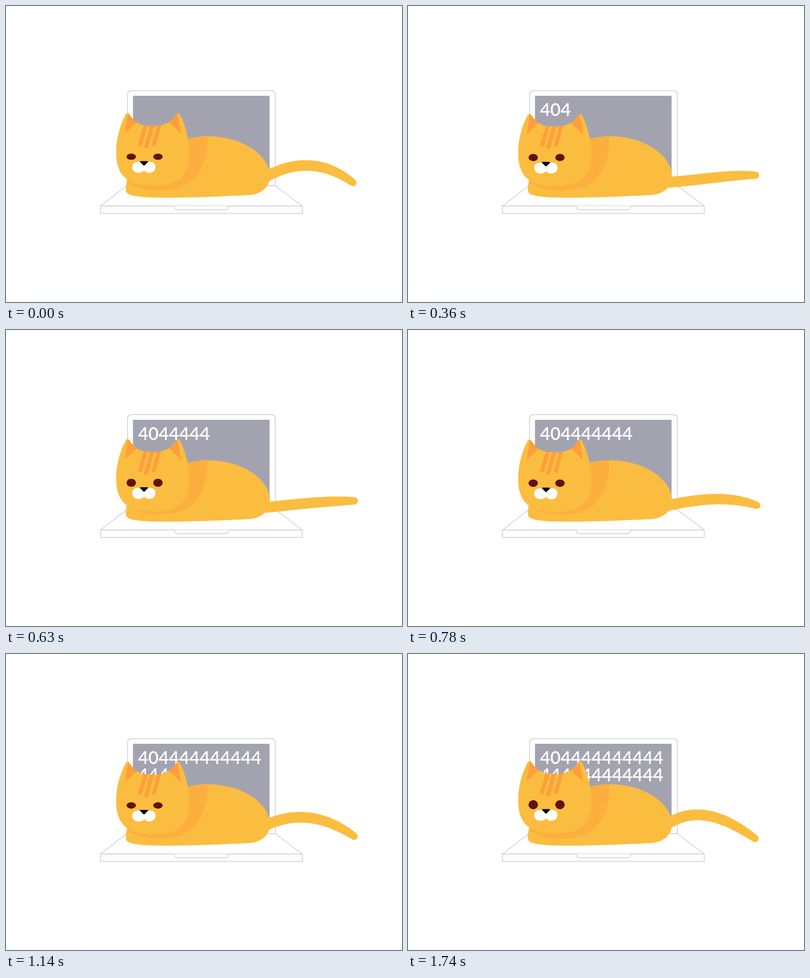
An HTML page that plays this animation: 800 px wide and 600 px high, repeating every 1800 ms.

```html
<!DOCTYPE html>
<html lang="en">
<head>
<meta charset="utf-8">
<title>Cat on a laptop</title>
<style>
  html, body { margin: 0; width: 100%; height: 100%; overflow: hidden; background: #fff; }
  svg { display: block; width: 100vw; height: 100vh; }
  .line { fill: #fff; stroke: #cdcdcf; stroke-width: 1.5; stroke-linejoin: round; }
  .fur { fill: #fbbd40; }
  .shade { fill: #fcaf3e; }
  .mark { fill: #fe9f3c; }
  .eye { fill: #5f1408; }
  text { font: 600 35.8px Lato, "Open Sans", sans-serif; fill: #fff; }
</style>
</head>
<body>
<svg viewBox="0 0 800 600">
  <defs>
    <path id="headShape" d="M241.5 220 Q244.5 215 248.5 218 C257 230 262 243 298 243
      C326 243 337 231 344 219.5 Q347.5 214.5 351.5 219.5 C363 243 370.5 272 370.5 300
      C370.5 345 345 364 298 364 C246 364 222.5 345 222.5 296 C222.5 268 231 240 241.5 220Z"/>
    <clipPath id="headClip"><use href="#headShape"/></clipPath>
  </defs>

  <g class="line">
    <path d="M245.5 364 V180 Q245.5 171.500 254 171.500 H535.500 Q544 171.500 544 180 V364Z"/>
    <path d="M244 364 H544 L598.500 405.500 H191Z"/>
    <path d="M191 405.500 H598.500 V420.500 H191Z"/>
    <path d="M339.500 405.500 Q340.500 413 347 413 H442.500 Q449 413 450 405.500"/>
  </g>
  <path fill="#a3a3b0" d="M256.500 182 H532.500 V352 H256.500Z"/>
  <text id="row1" x="266.700" y="222.500"></text>
  <text id="row2" x="266.700" y="257.500"></text>

  <path id="tail" class="fur"/>
  <path class="fur" d="M245.500 350 C242 362 241 370 243 377 C246 383 258 388.500 320 388.500
    C380 388.500 430 386 488 383.500 C518 382 533 366 533 345 C533 303 478 264 407 264
    C393 264 380 266 368 269 L300 290Z"/>
  <path class="shade" d="M368 269 C380 266 393 264 407 264 C407.500 318 391 374 308 374.500
    C280 374.500 257 366 244.500 357 L245.500 350 L300 290Z"/>

  <g id="head">
    <use href="#headShape" class="fur"/>
    <g class="mark" clip-path="url(#headClip)">
      <path d="M246.500 218 L264 236 L239.500 259Z"/>
      <path d="M347 218 L329.500 236 L354 259Z"/>
      <path d="M278.500 240 H286.500 L274.500 283.500 H266Z"/>
      <path d="M292 240 H300 L287 288 H278.500Z"/>
      <path d="M306 240 H314 L302 283.500 H294Z"/>
    </g>
    <ellipse class="eye" cx="253" cy="305.500" rx="9.500"/>
    <ellipse class="eye" cx="307" cy="305.500" rx="9.500"/>
    <path fill="#fff" d="M266 316 H291 C299 316 302 321 302 326.500 C302 333 297 338 290 338
      C285 338 281 336 279 333 C277 336 273 338 267.500 338 C260 338 255 333 255 327
      C255 321 258 316 266 316Z"/>
    <path d="M271.500 314.500 H286 Q287.800 315 286.600 316.600 L280 323 Q278.800 324.200 277.600 323
      L271 316.600 Q269.700 315 271.500 314.500Z"/>
  </g>
</svg>
<script>
const LOOP = 1800, STEP = 30, LAST = 1740;
const $ = id => document.getElementById(id);
const eyes = document.querySelectorAll(".eye");

// Smooth track through [time, value] keys, held after the last key.
function track(keys) {
  const n = keys.length;
  const rise = i => (keys[i + 1][1] - keys[i][1]) / (keys[i + 1][0] - keys[i][0]);
  const slope = keys.map((k, i) => {
    if (i === 0) return rise(0);
    if (i === n - 1) return 0;
    const a = rise(i - 1), b = rise(i);
    return a * b > 0 ? 2 * a * b / (a + b) : 0;
  });
  return t => {
    if (t >= keys[n - 1][0]) return keys[n - 1][1];
    const i = keys.findIndex((k, j) => t < keys[j + 1][0]);
    const [t0, v0] = keys[i], [t1, v1] = keys[i + 1];
    const h = t1 - t0, u = (t - t0) / h, w = 1 - u;
    return v0 * w * w * (1 + 2 * u) + v1 * u * u * (3 - 2 * u)
      + h * u * w * (slope[i] * w - slope[i + 1] * u);
  };
}

const headDrop = track([[0, 0], [120, 0], [210, .4], [510, 3], [780, 5], [1140, 1.5], [1350, 0]]);
const eyeOpen = track([[0, 6.3], [210, 6.1], [510, 8.5], [780, 7.5], [1140, 6.5], [1440, 8.8], [1680, 9.2]]);

// Tail poses: time, heights at the root, one third, two thirds and the tip, then the tip's x.
const poses = [
  [0, 343.5, 324.5, 328.5, 358, 701],
  [210, 350.5, 341, 336.5, 345.5, 701.5],
  [510, 361, 357, 351, 342, 703],
  [780, 354.5, 345, 343.5, 355.5, 704.5],
  [1140, 345, 331, 339.5, 369.5, 703.5],
  [1440, 341, 326, 340, 374, 701]
];
const tailTracks = [1, 2, 3, 4, 5].map(c => track(poses.map(p => [p[0], p[c]])));

function tailPath(t) {
  const [y0, ya, yb, y3, tipX] = tailTracks.map(f => f(t));
  const rootX = 530, span = tipX - rootX;
  const y1 = (-5 * y0 + 18 * ya - 9 * yb + 2 * y3) / 6;
  const y2 = (2 * y0 - 9 * ya + 18 * yb - 5 * y3) / 6;
  const top = [], bottom = [], n = 32, start = -.08;
  let r;
  for (let i = 0; i <= n; i++) {
    const s = start + (1 - start) * i / n, q = 1 - s;
    const x = rootX + span * s;
    const y = q * q * q * y0 + 3 * q * q * s * y1 + 3 * q * s * s * y2 + s * s * s * y3;
    const dy = 3 * (q * q * (y1 - y0) + 2 * q * s * (y2 - y1) + s * s * (y3 - y2));
    const len = Math.hypot(span, dy);
    r = 11 - .4 * s - 3.3 * s ** 5;
    const nx = dy / len * r, ny = span / len * r;
    top.push(`${(x + nx).toFixed(2)} ${(y - ny).toFixed(2)}`);
    bottom.unshift(`${(x - nx).toFixed(2)} ${(y + ny).toFixed(2)}`);
  }
  return `M${top.join("L")}A${r} ${r} 0 0 1 ${bottom.join("L")}Z`;
}

function draw(t) {
  const count = Math.max(0, Math.min(24, Math.floor((t - 140) / 66)));
  const typed = ("40" + "4".repeat(22)).slice(0, count);
  $("row1").textContent = typed.slice(0, 12);
  $("row2").textContent = typed.slice(12);
  $("tail").setAttribute("d", tailPath(t));
  $("head").setAttribute("transform", `translate(0 ${headDrop(t)})`);
  eyes.forEach(e => e.setAttribute("ry", eyeOpen(t)));
}

const begin = performance.now();
function tick() {
  const t = (performance.now() - begin) % LOOP;
  draw(Math.min(LAST, Math.floor(t / STEP) * STEP));
  requestAnimationFrame(tick);
}
tick();
</script>
</body>
</html>
```
